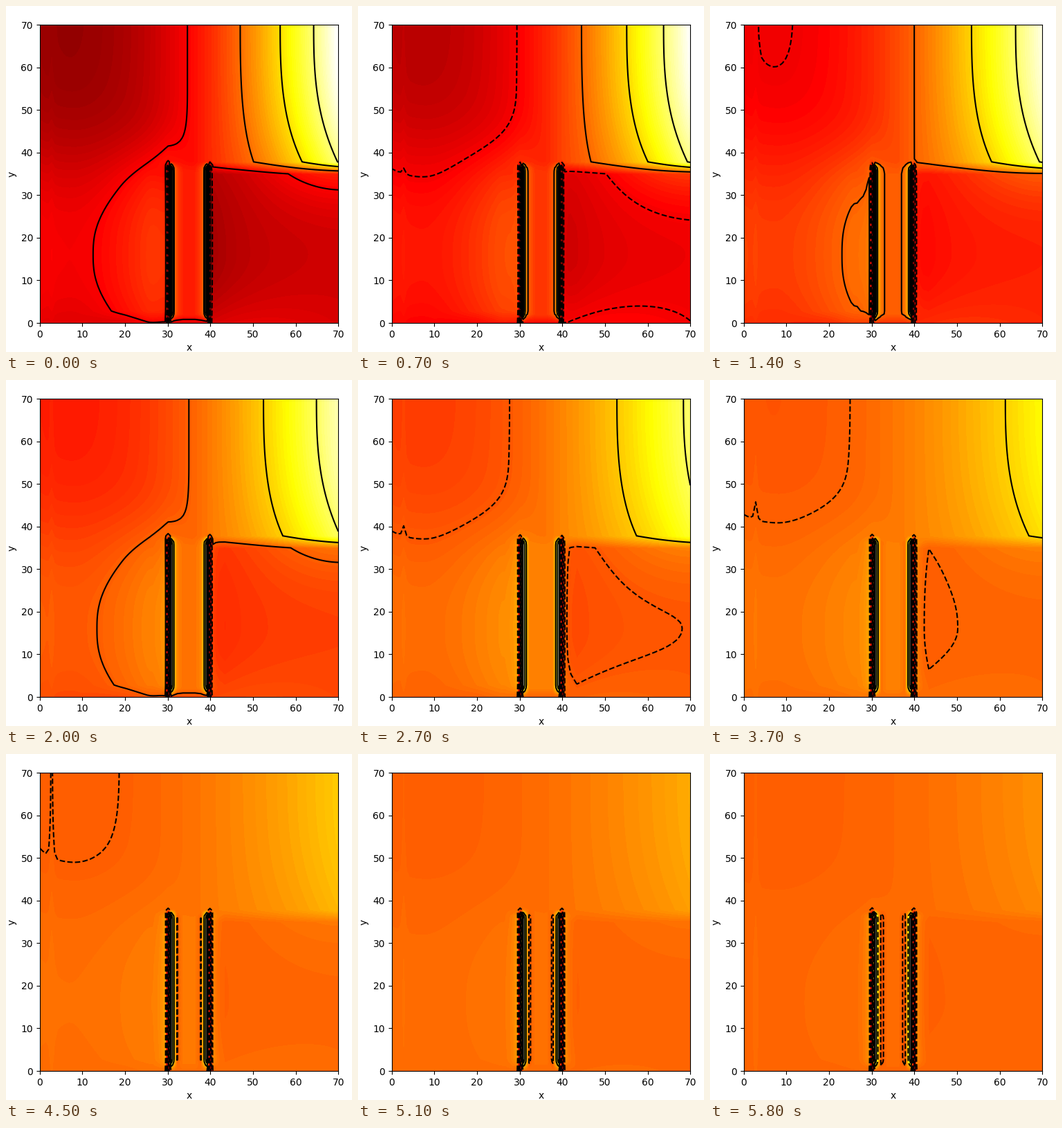
A matplotlib script for the animation above (5.9 s loop, 500 by 500 pixels).

```python
import numpy as np
import matplotlib.pyplot as plt
from matplotlib.animation import FuncAnimation

FRAMES, INTERVAL = 59, 100
SIZE, N = 70, 101
STEP = .168  # spacing of the contour lines


def ramp(x, a, b):
    return np.clip((x - a) / (b - a), 0, 1)


def smooth(x, a, b):
    u = ramp(x, a, b)
    return u * u * (3 - 2 * u)


def open_area(x, y):
    """Pressure above the step and left of the plates."""
    lag = ((SIZE - np.maximum(y, 37.8)) / 32) ** 2.7
    shift = 5.5 * (1 - ((SIZE - np.maximum(x, 40)) / 30) ** 2)
    top = .022 + .96 * ((x - shift * lag - 7) / 63) ** 2
    side = (.172 + .03 * smooth(x, 8, 25)) * np.exp(-(np.abs(y - 16) / 27.3) ** 2.6)
    fade = (1 - smooth(x, 5, 34) * smooth(y, 32, 55)) * (1 - ramp(x, 30, 36))
    floor = .06 * (1 - ramp(y, 0, 2.8)) * ramp(x, 10, 20)
    return top + side * fade - floor


def right_area(x, y):
    """Pressure below the step."""
    mid = .13 - .075 * np.exp(-np.maximum(x - 41, 0) / 10)
    rise = .03 + .11 * smooth(x, 45, 70)
    drop = .09 - .0024 * (x - 40)
    return (mid + rise * np.clip((y - 16) / 19, 0, None) ** 2.5
            + drop * np.clip((16 - y) / 16, 0, None) ** 2)


axis = np.linspace(0, SIZE, N)
X, Y = np.meshgrid(axis, axis)
above = ramp(Y, 35, 37.8)
upper = open_area(X, Y)
left = upper - .05 * smooth(X, 25, 31)
gap = .265 - .1 * (1 - ramp(Y, 0, 2))
lower = np.where(X < 30.2, left, np.where(X < 39, gap, right_area(X, Y)))
SHAPE = upper * above + lower * (1 - above)
BUMP = .0065 * np.exp(-((X - 2.8) / .5) ** 2)

# how strongly the low and high sides of a plate act in each row
low_rows = 1 - ramp(axis, 36.6, 38)
high_rows = (1 - ramp(axis, 36.2, 37.6)) * ramp(axis, .4, 2.4)


def field(decay):
    base = .504 - .315 * decay ** 2.4
    v = base + .83 * decay * SHAPE + BUMP
    outer = .06 * np.sqrt(1 - decay)
    inner = -.05 * np.cos(np.pi * decay)
    for col, side in ((43, 1), (57, -1)):
        for k in range(1, 5):
            v[:, col - side * k] += outer * np.exp(-.7 * (k - 1)) * high_rows
        v[:, col + 2 * side] += .12 * high_rows
        v[:, col + 3 * side] += inner * high_rows
        v[:, col + 4 * side] += .4 * inner * high_rows
        for c, rows, peak in ((col, low_rows, .01), (col + side, high_rows, .97)):
            v[:, c] += (peak - v[:, c]) * rows
    return base, v


fig = plt.figure(figsize=(5, 5), dpi=100)
ax = fig.add_axes([48.75 / 500, 42 / 500, 431.5 / 500, 431 / 500])
ax.set(xlim=(0, SIZE), ylim=(0, SIZE), xlabel="x", ylabel="y")
drawn = []


def draw(i):
    while drawn:
        drawn.pop().remove()
    decay = np.exp(-(i / 34) ** 1.6)
    base, v = field(decay)
    drawn.append(ax.contourf(X, Y, v, np.linspace(0, 1, 101), cmap="hot",
                             vmin=0, vmax=1, extend="both"))
    # one line follows this height of the shape, the others keep their distance
    height = np.interp(i, [0, 7, 14, 27, 37, 45, 58],
                       [.409, .362, .285, .125, .10, .055, -.05])
    zero = int(.42 * np.sqrt(i)) - 1
    p = v - base - .83 * decay * height - zero * STEP
    drawn.append(ax.contour(X, Y, p, STEP * (np.arange(-4, 5) - zero), colors="k"))
    return drawn


anim = FuncAnimation(fig, draw, frames=FRAMES, interval=INTERVAL,
                     repeat=True, repeat_delay=0, blit=False)
plt.show()
```
